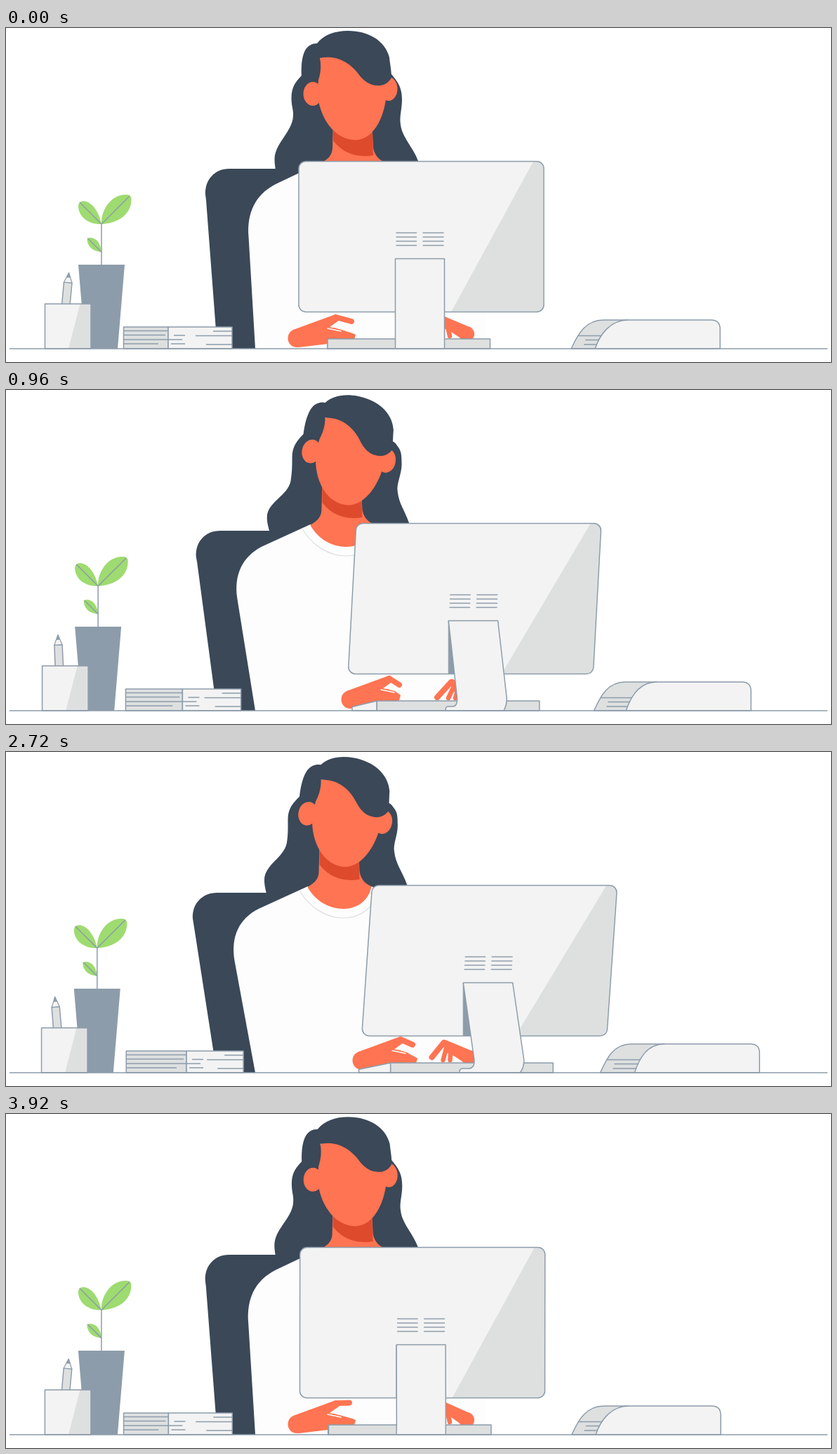
An HTML page with a canvas that plays this animation: 1175 by 477 pixels, repeating every 4 s.

```html
<!DOCTYPE html>
<html lang="en">
<head>
<meta charset="utf-8">
<title>Working at a desk</title>
<style>
  html, body { margin: 0; width: 100%; height: 100%; overflow: hidden; background: #fff; }
  canvas { display: block; width: 1175px; height: 477px; }
</style>
</head>
<body>
<canvas id="stage"></canvas>
<script>
const W = 1175, H = 477, LOOP = 4000, STEP = 80;
const LINE = '#8d9caa', LIGHT = '#f3f3f3', SHADE = '#dee0e0', NAVY = '#3a4858',
      SKIN = '#ff7452', DARK_SKIN = '#de4a2c', SHIRT = '#fdfdfd', GREEN = '#9edb70';

const canvas = document.getElementById('stage');
const ctx = canvas.getContext('2d');
const dpr = window.devicePixelRatio || 1;
canvas.width = W * dpr;
canvas.height = H * dpr;

// Camera swing: out during the first half of the loop, back in the second.
const SWING = [0, .06, .175, .33, .5, .633, .742, .823, .892, .952, 1];

// Times of the hand poses.
const TIMES = [0, 640, 960, 1600, 2240, 3200, 3920, 4000];
// wrist, upper fingertip, lower fingertip
const LEFT_HAND = [
  [414, 443, 495, 419, 496, 441],
  [490, 440, 566, 405, 569, 437],
  [490, 442, 563, 421, 560, 439],
  [511, 441, 574, 421, 587, 441],
  [514, 442, 589, 418, 594, 441],
  [498, 439, 575, 414, 574, 440],
  [414, 443, 492, 411, 496, 440]
];
// wrist, knuckle, fingertip
const RIGHT_HAND = [
  [656, 437, 618, 414, 604, 438],
  [662, 437, 632, 414, 614, 438],
  [668, 437, 634, 417, 612, 440],
  [662, 431, 628, 407, 604, 419],
  [656, 437, 617, 416, 598, 440],
  [664, 437, 630, 414, 611, 438],
  [656, 437, 618, 413, 604, 438]
];

let k = 0;

function swing(t) {
  const pos = (1 - Math.abs(t / (LOOP / 2) - 1)) * 10;
  const i = Math.min(9, Math.floor(pos)), s = pos - i;
  const at = n => n < 0 ? SWING[-n] : n > 10 ? 1.03 : SWING[n];
  const a = at(i), b = at(i + 1);
  const da = (b - at(i - 1)) / 2, db = (at(i + 2) - a) / 2;
  const s2 = s * s, s3 = s2 * s;
  return a * (2 * s3 - 3 * s2 + 1) + da * (s3 - 2 * s2 + s) +
         b * (3 * s2 - 2 * s3) + db * (s3 - s2);
}

// Value along the swing: straight from a to b, or a parabola through mid.
function m(a, b, mid) {
  if (mid === undefined) return a + (b - a) * k;
  const q = .532;
  const slope = (mid - a - q * q * (b - a)) / (q - q * q);
  return a + slope * k + (b - a - slope) * k * k;
}

function pose(keys, t) {
  let i = 0;
  while (t >= TIMES[i + 1]) i++;
  const s = (t - TIMES[i]) / (TIMES[i + 1] - TIMES[i]);
  const e = s * s * (3 - 2 * s), next = keys[(i + 1) % keys.length];
  return keys[i].map((v, j) => v + (next[j] - v) * e);
}

function shape(d, fill, stroke, width = 1.5) {
  const path = typeof d === 'string' ? new Path2D(d) : d;
  if (fill) { ctx.fillStyle = fill; ctx.fill(path); }
  if (stroke) { ctx.strokeStyle = stroke; ctx.lineWidth = width; ctx.stroke(path); }
}

const line = (x1, y1, x2, y2, color = LINE, width = 1.5) =>
  shape(`M${x1},${y1}L${x2},${y2}`, null, color, width);

function oval(x, y, rx, ry, fill) {
  const p = new Path2D();
  p.ellipse(x, y, rx, ry, 0, 0, Math.PI * 2);
  shape(p, fill);
}

function shifted(dx, draw) {
  ctx.save();
  ctx.translate(dx, 0);
  draw();
  ctx.restore();
}

function chair() {
  shape(`M${m(390, 371)},201 L${m(318, 296, 308)},201
    C${m(297, 275, 286)},201 ${m(283, 259.5, 272.5)},217 ${m(284, 261, 273.5)},238
    L${m(285, 262, 275)},246 L${m(301, 300)},458 L360,458 L420,201Z`, NAVY);
}

function backHair() {
  const ax = m(421, 409, 426), ay = m(68, 66, 63);
  const bx = m(406.5, 393, 410), by = m(100, 97, 96);
  const cx = m(408.5, 392.5, 408), cy = 130;
  const dx = m(382.5, 364, 374), dy = m(188, 185, 182);
  const fx = m(549, 541, 556), fy = m(66, 74, 75);
  const gx = m(564, 550, 566), gy = m(102, 103, 106);
  const hx = m(562, 547, 560), hy = m(138, 138, 146);
  const ix = m(587, 569, 576);
  shape(`M${ax},${ay} C${ax - 8},${ay + 8} ${bx},${by - 16} ${bx},${by}
    C${bx},${by + 14} ${cx + 2},${cy - 13} ${cx},${cy}
    C${cx - 4},${cy + 21} ${dx},${dy - 22} ${dx},${dy}
    C${dx},${dy + 6} ${dx + 1},${dy + 11} ${m(384, 366, 378)},203
    L${ix},203 L${ix},190 C${ix - 6},172 ${hx + 2},${hy + 18} ${hx},${hy}
    C${hx - 2},${hy - 12} ${gx},${gy + 15} ${gx},${gy}
    C${gx},${gy - 18} ${fx + 8},${fy + 10} ${fx},${fy}
    L500,40Z`, NAVY);
}

function body() {
  const n = m(0, -23, -13);
  shape(`M355,458 L${m(345.5, 322, 332)},298
    C${m(343, 316, 327)},264 ${m(355, 327, 340)},238 ${m(384, 357, 367)},${m(223, 224)}
    L${449 + n},192 L${540 + n},192 L${580 + n},208 L682,300 V458Z`, SHIRT);
  shifted(n, () => {
    shape('M438,199 C452,222 475,237 500,237 C526,237 546,220 549,196', null, '#dcdfe1', 1.2);
    shape(`M466,130 L465,170 C465,184 456,188 449,193 C460,213 480,224 500,224
      C520,224 536,212 540,192 C530,188 524,180 523,170 L521,130Z`, SKIN);
    shape('M466,130 V161 C478,176 495,186 523,182 L521,130Z', DARK_SKIN);
  });
}

function head() {
  const cx = 491.5, cy = 90;
  ctx.save();
  ctx.translate(cx + m(0, -14, 0), cy + m(0, 2.7, 4));
  ctx.rotate(m(0, 7.7, 10.6) * Math.PI / 180);
  ctx.translate(-cx, -cy);
  oval(545, 87, 12.5, 17, SKIN);
  shape(`M446,45 L444,95 C446,125 466,160 498,160 C526,159 541,122 542,90
    L545,60 C520,20 460,30 446,45Z`, SKIN);
  shape(`M423,86 C420,70 419,45 426,32 C430,25 436,22 443,22 C452,10 468,4 487,4
    C516,4 540,18 546,42 C547,52 549,60 549,71 C544,80 536,83 528,82
    C518,82 509,75 503,67 C490,49 470,38 447,43 C450,57 447,70 443,80Z`, NAVY);
  oval(437, 94, 13.5, 17, SKIN);
  ctx.restore();
}

function hands(t) {
  const tap = Math.sin(t / 640 * Math.PI * 2) * 2;
  ctx.lineCap = 'round';

  let [wx, wy, ux, uy, lx, ly] = pose(LEFT_HAND, t);
  let kx = wx + 57, ky = wy - 30;
  uy += tap;
  oval(wx, wy, 12.5, 13, SKIN);
  shape(`M${wx - 5},${wy - 12} L${kx - 2},${ky - 4} L${kx + 4},${ky + 4}
    L${kx - 10},${ky + 14} L${kx + 7},${ky + 18} L${lx + 2},${ly - 3} L${lx},${ly + 4}
    L${wx + 45},${wy + 8} L${wx + 3},${wy + 13}Z`, SKIN);
  line(kx - 1, ky, ux - 3, uy, SKIN, 8);
  line(kx - 4, ky + 19, lx - 3, ly - 1, SKIN, 8);
  line(kx - 13, ky + 16, kx + 6, ky + 20, SHIRT, 1.3);

  let fx, fy;
  [wx, wy, kx, ky, fx, fy] = pose(RIGHT_HAND, t);
  fy -= tap;
  oval(wx, wy, 11, 11, SKIN);
  shape(`M${wx + 4},${wy - 10} L${kx + 2},${ky - 4} L${kx - 3},${ky}
    L${kx + 4},${ky + 14} L${kx + 16},${ky + 20} L${wx - 4},${wy + 9}Z`, SKIN);
  line(kx, ky, fx + 2, fy - 1, SKIN, 8);
  line(kx + 4, ky + 6, fx + 18, Math.min(fy + 9, 440), SKIN, 6.5);
  line(kx + 10, ky + 8, fx + 28, Math.min(fy + 13, 440), SKIN, 6.5);
  ctx.lineCap = 'butt';
}

function plant() {
  shifted(m(136, 128.5), () => {
    shape('M-33,338 H33 L23,458 H-23Z', LINE);
    shape('M0,280 C-1,262 12,238 35,238 C41,238 43,241 42.5,246 C42,266 24,279 0,280Z', GREEN);
    shape('M0,280 C-18,281 -33,270 -33,254 C-33,243 -9,242 0,280Z', GREEN);
    shape('M0,320 C-12,319 -21,312 -20.5,300 C-10,297 -1,305 0,320Z', GREEN);
    line(0, 338, 0, 279);
    line(0, 280, 40, 240);
    line(0, 280, -31, 249);
    line(0, 320, -19, 301);
  });
}

function cup() {
  const b = m(79.5, 65), sx = m(82.5, 61.5), sy = m(363, 365);
  const rx = m(94, 72.5), ry = m(364, 363.5), tx = m(89.5, 65.5), ty = 349.5;
  const mix = (a, z) => a + (z - a) * .5;
  shape(`M${b},396 L${sx},${sy} L${rx},${ry} L${b + 11.5},396Z`, SHADE, LINE);
  shape(`M${sx},${sy} L${tx},${ty} L${rx},${ry}Z`, LIGHT, LINE, 1.2);
  shape(`M${mix(sx, tx)},${mix(sy, ty)} L${tx},${ty} L${mix(rx, tx)},${mix(ry, ty)}Z`, LINE);
  shifted(m(55.5, 49.5), () => {
    shape('M0,394 H65.5 V458 H0Z', LIGHT);
    shape('M50,394 H65.5 V458 H33.5Z', SHADE);
    shape('M0,394 H65.5 V458 H0Z', null, LINE);
  });
}

function papers() {
  const l = m(167.5, 172), s = m(231, 262.5), r = m(322, 341.5);
  shape(`M${l},427 H${s} V458 H${l}Z`, SHADE, LINE);
  shape(`M${s},427 H${r} V458 H${s}Z`, LIGHT, LINE);
  line(l, 432.5, s, 432.5);
  line(l, 438.5, s - 4, 438.5);
  line(l, 445, s, 445);
  line(l, 451, s - 14, 451);
  line(r - 27, 433, r, 433);
  line(r - 52, 439.5, r, 439.5);
  line(s + 8, 439, s + 24, 439);
  line(s, 445, s + 20, 445);
  line(s + 4, 451, s + 24, 451);
  line(r - 37, 452, r, 452);
}

function folder() {
  const b = m(805, 855), bt = m(851, 899), f = m(839, 907), ft = m(886, 949), r = m(1017, 1085);
  shape(`M${b},458 C${b + 10},436 ${bt - 25},417 ${bt},417 H${ft} L${f},458Z`, SHADE, LINE);
  line(b + 9, 439.5, f + 10, 439.5);
  line(b + 20, 445.5, f + 6, 445.5);
  line(b + 18, 452, f + 3, 452);
  shape(`M${f},458 C${f + 7},437 ${ft - 25},417 ${ft},417 H${r - 13}
    Q${r},417 ${r},430 V458Z`, LIGHT, LINE);
}

function keyboard() {
  const x = m(458, 566.5), side = m(458, 512), r = m(689.5, 798);
  shape(`M${side},458 V${m(450, 454)} L${x},444 V458Z`, LIGHT, LINE);
  shape(`M${x},444 H${r} V458 H${x}Z`, SHADE, LINE);
}

function roundQuad(pts, radius) {
  const p = new Path2D(), [a, b] = [pts[0], pts[1]];
  p.moveTo((a[0] + b[0]) / 2, (a[1] + b[1]) / 2);
  for (let i = 1; i <= 4; i++) p.arcTo(...pts[i % 4], ...pts[(i + 1) % 4], radius);
  p.closePath();
  return p;
}

function monitor() {
  const top = 190.5, low = 405.5;
  const tr = m(766, 892.5), br = m(766, 874.5);
  const panel = roundQuad([[m(417, 543.5), top], [tr, top], [br, low], [m(417, 525.5), low]], 10);
  shape(panel, LIGHT);
  ctx.save();
  ctx.clip(panel);
  shape(`M${m(751, 877)},${top} H${tr + 2} L${br + 2},${low} H${m(634, 745)}Z`, SHADE);
  ctx.restore();
  shape(panel, null, LINE);
  for (let i = 0; i < 4; i++) {
    const x = m(555.5, 674.2 - i * .4), y = 292.5 + i * 6;
    line(x, y, x + 29.5, y);
    line(x + 38, y, x + 68, y);
  }
}

function stand() {
  const l = m(554.5, 671.5), r = m(624.5, 742);
  const ll = m(554.5, 690.5), rl = m(624.5, 761.5);
  const foot = m(554.5, 665), end = m(624.5, 755);
  shape(`M${l},330 V405.5 H${m(554.5, 685)}Z`, LINE, LINE, 1);
  shape(`M${l},329.5 H${r} L${rl},440 Q${m(624.5, 762)},449 ${end},458 H${foot}
    Q${foot},452 ${m(554.5, 670)},452 L${m(554.5, 682)},452
    Q${m(554.5, 691.5)},451 ${ll},440Z`, LIGHT, LINE);
}

function draw(now) {
  const t = Math.floor((now % LOOP) / STEP) * STEP;
  k = swing(t) / .94;
  ctx.setTransform(dpr, 0, 0, dpr, 0, 0);
  ctx.lineJoin = 'round';
  ctx.fillStyle = '#fff';
  ctx.fillRect(0, 0, W, H);
  chair();
  backHair();
  body();
  head();
  hands(t);
  plant();
  cup();
  papers();
  folder();
  keyboard();
  monitor();
  stand();
  line(5, 458, 1170, 458);
}

function loop(now) {
  draw(now);
  requestAnimationFrame(loop);
}
draw(0);
requestAnimationFrame(loop);
</script>
</body>
</html>
```
